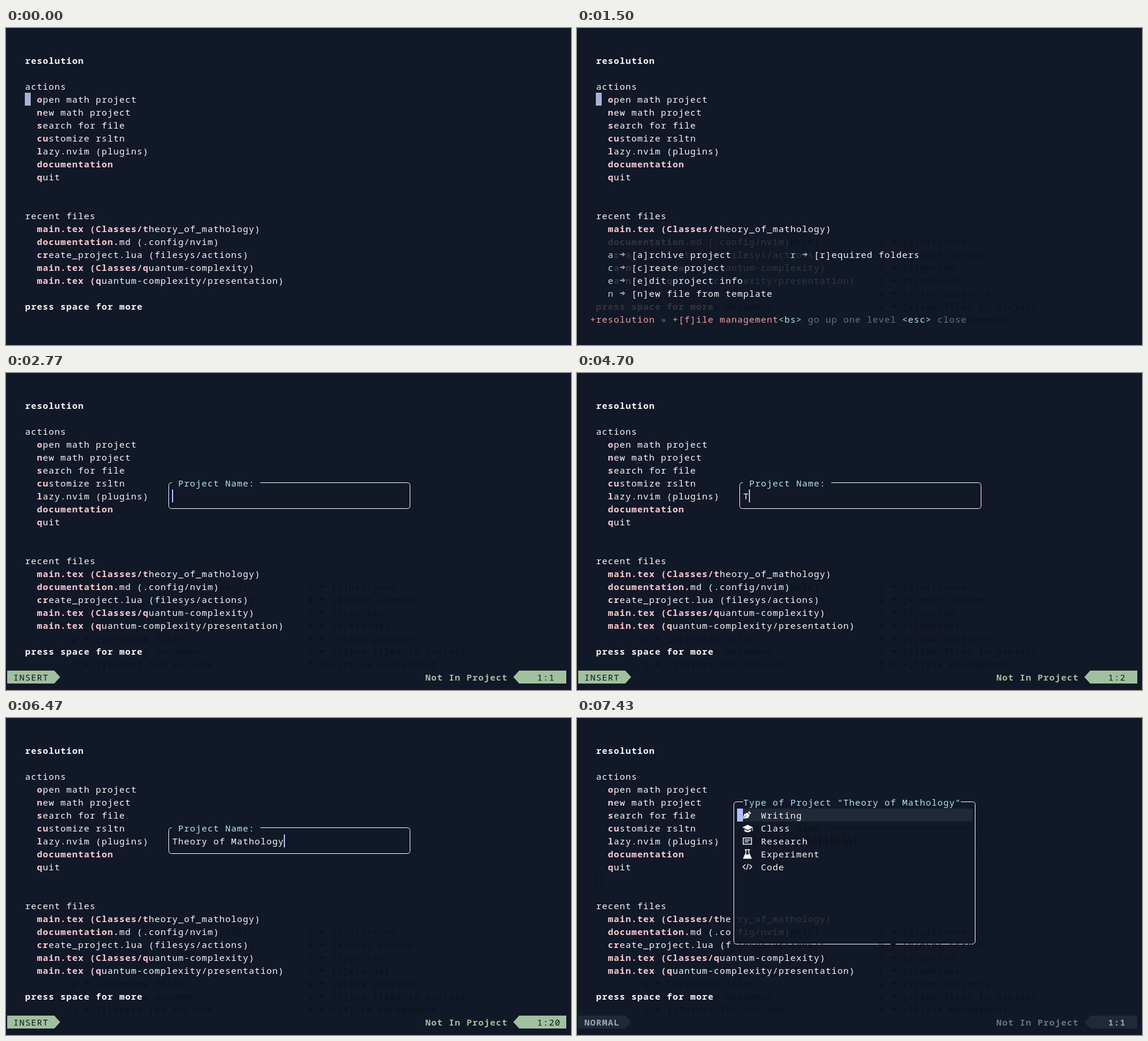
Write an HTML page that moves like this. It is 960x539 px and loops after 8 s.

```html
<!DOCTYPE html>
<html lang="en">
<head>
<meta charset="utf-8">
<title>Project launcher</title>
<style>
html, body { margin: 0; width: 100%; height: 100%; overflow: hidden; background: #111827; }
svg { display: block; width: 100%; height: 100%; }
text { font: 15px "Noto Sans Mono", "DejaVu Sans Mono", monospace; letter-spacing: 1px; white-space: pre; font-variant-ligatures: none; }
text.b { font-weight: 700; }
</style>
</head>
<body>
<svg id="stage" viewBox="0 0 960 539"></svg>
<script>
const LOOP = 8000, ROWS = 24, COLS = 96, CW = 10, RH = 22;
const C = {
  bg: '#111827', text: '#f9fafb', pink: '#fecdd3', cyan: '#b6e3f4', salmon: '#f0a0a0',
  gray: '#6b7280', arrow: '#9298a3', dim: '#34363b', ghost: '#0c111c', green: '#a0c09f',
  bar: '#1f2937', lilac: '#b4befe', cursor: '#abb0d8', rose: '#ddc9c9', soft: '#9ca3af'
};

// row, number of highlighted letters, text
const LINKS = [
  [5, 1, 'open math project'],
  [6, 1, 'new math project'],
  [7, 1, 'search for file'],
  [8, 2, 'customize rsltn'],
  [9, 1, 'lazy.nvim (plugins)'],
  [10, 13, 'documentation'],
  [11, 1, 'quit'],
  [15, 19, 'main.tex (Classes/theory_of_mathology)'],
  [16, 14, 'documentation.md (.config/nvim)'],
  [17, 2, 'create_project.lua (filesys/actions)'],
  [18, 19, 'main.tex (Classes/quantum-complexity)'],
  [19, 11, 'main.tex (quantum-complexity/presentation)']
];
const ROOT_LEFT = ['c[c]hoose a theme (pumpkin)', 'd[d]ocumentation for project', 'm[m]ake new snippet',
  'o[o]pen pdf viewer', 'p[p]review files', 'c[c]ompile document', 'i[i]nsert TeX include'];
const ROOT_RIGHT = ['q[q]uit/save', 'R[R]eset screen', 'S[S]ynctex', 't[t]erminal',
  'V[V]iew projects', 'v[v]iew files in project', 'f+[f]ile management'];
const FILE_LEFT = ['a[a]rchive project', 'c[c]reate project', 'e[e]dit project info', 'n[n]ew file from template'];
const FILE_RIGHT = ['r[r]equired folders'];
const KINDS = ['Writing', 'Class', 'Research', 'Experiment', 'Code'];

const NAME = 'Theory of Mathology';
// bursts of typing: first key, last key, number of keys
const BURSTS = [[4700, 5430, 10], [5570, 5830, 4], [5970, 6100, 2], [6270, 6300, 2], [6470, 6470, 1]];
const KEYS = BURSTS.flatMap(([a, b, n]) =>
  Array.from({ length: n }, (_, i) => n > 1 ? a + (b - a) * i / (n - 1) : a));

const SCENES = [[0, 'home'], [1000, 'root'], [1500, 'files'], [2730, 'ask'], [2770, 'type'],
  [7370, 'back'], [7400, 'kinds'], [7430, 'pick']];

const stage = document.getElementById('stage');
let grid, under, over;

const X = col => 2 + col * CW;
const Y = row => row * RH;
const esc = s => s.replace(/&/g, '&amp;').replace(/</g, '&lt;').replace(/>/g, '&gt;');
const rect = (x, y, w, h, fill) => `<rect x="${x}" y="${y}" width="${w}" height="${h}" fill="${fill}"/>`;
const path = (d, fill, stroke = 'none', width = 1) =>
  `<path d="${d}" fill="${fill}" stroke="${stroke}" stroke-width="${width}"/>`;
const block = (col, row, fill) => rect(X(col), Y(row), CW, RH, fill);

function put(row, col, text, color = C.text, bold = false, overlay = false) {
  [...text].forEach((ch, i) => {
    if (!overlay || ch !== ' ') grid[row][col + i] = { ch, color, bold };
  });
}

function recolor(r0, r1, c0, c1, color) {
  for (let r = r0; r <= r1; r++)
    for (let c = c0; c <= c1; c++)
      if (grid[r][c] && grid[r][c].color !== C.ghost) grid[r][c].color = color;
}

function menu(items, row, col, tint) {
  items.forEach((item, i) => {
    const label = item.slice(1), group = label[0] === '+';
    put(row + i, col, item[0], tint || C.cyan);
    put(row + i, col + 2, '→', tint || C.arrow);
    put(row + i, col + 4, label, tint || (group ? C.salmon : C.text), false, true);
  });
}

function rootMenu(tint) {
  menu(ROOT_LEFT, 16, 11, tint);
  menu(ROOT_RIGHT, 16, 51, tint);
}

function home() {
  put(2, 3, 'resolution', C.text, true);
  put(4, 3, 'actions');
  put(14, 3, 'recent files');
  put(21, 3, 'press space for more', C.text, true);
  for (const [row, n, text] of LINKS) {
    put(row, 5, text.slice(0, n), C.pink, true);
    put(row, 5 + n, text.slice(n));
  }
}

function fileMenu() {
  menu(FILE_LEFT, 17, 5);
  menu(FILE_RIGHT, 17, 36);
  const parts = [['+resolution', C.salmon], [' » ', C.gray], ['+[f]ile management', C.salmon],
    ['<bs>', C.cyan], [' go up one level ', C.gray], ['<esc>', C.cyan], [' close', C.gray]];
  let col = 2;
  for (const [text, color] of parts) {
    put(22, col, text, color);
    col += text.length;
  }
}

// rounded frame, open along the top between gap0 and gap1
function frame(x0, y0, x1, y1, gap0, gap1, color) {
  const r = 5;
  return path(`M${gap1} ${y0}H${x1 - r}q${r} 0 ${r} ${r}V${y1 - r}q0 ${r} ${-r} ${r}H${x0 + r}` +
    `q${-r} 0 ${-r} ${-r}V${y0 + r}q0 ${-r} ${r} ${-r}H${gap0}`, 'none', color);
}

function askBox(typed, ghost) {
  const line = ghost ? C.ghost : C.text;
  under += frame(276.5, 186.5, 686.5, 230.5, 282, 432, line);
  put(8, 29, 'Project Name:', ghost ? C.ghost : C.cyan);
  put(9, 28, typed, line);
  if (!ghost) over += rect(X(28 + typed.length), Y(9), 2, RH, C.lilac);
  else for (let i = 0; i <= typed.length; i++) under += rect(X(28 + i), Y(9), 1.5, RH, C.ghost);
}

function status(mode, pos) {
  const on = mode === 'INSERT', fill = on ? C.green : C.bar, ink = on ? C.bg : C.soft;
  under += path('M2 506H82L92 517 82 528H2zM952 506H872L862 517 872 528H952z', fill);
  put(23, 1, mode, ink, !on);
  put(23, 71, 'Not In Project', on ? C.green : C.gray, true);
  put(23, 90, pos, ink, !on);
}

function icons() {
  const w = C.text;
  return path('M281.5 171.5 284 163.5 289.5 161 293.5 165 291 170zM290.5 160 292.5 158.5 295.5 161.5 294 164z', w) +
    path('M282.5 170.5 287.5 165.5', 'none', C.bar) +
    path('M281 186 290 181.5 299 186 290 190.5zM284.5 189.2V192.5Q290 196 295.5 192.5V189.2L290 192z', w) +
    path('M298 186V192', 'none', w) +
    path('M282.5 204H296.5V214.5H282.5zM285 207.5H294.5M285 210.5H291.5', 'none', w, 1.5) +
    path('M285 224H294M287 224V229.5L283 238.5H296L292 229.5V224', 'none', w, 1.5) +
    path('M286 232H293L296.5 239H282.5z', w) +
    path('M286 249 282 253 286 257M293 249 297 253 293 257M291 248 288 258', 'none', w, 1.4);
}

function kindBox() {
  for (let r = 6; r <= 17; r++) grid[r][26] = null;
  recolor(7, 16, 27, 66, C.dim);
  recolor(17, 17, 27, 66, C.ghost);
  under += frame(266.5, 142.5, 676.5, 384.5, 282, 652, C.text);
  under += rect(272, 154, 400, 22, C.bar) + block(27, 7, C.lilac);
  put(6, 28, `Type of Project "${NAME}"`, C.cyan);
  KINDS.forEach((kind, i) => put(7 + i, 31, kind));
  over += icons();
}

function gridMarkup() {
  let out = '';
  grid.forEach((cells, row) => {
    for (let c = 0; c < COLS; c++) {
      const cell = cells[c];
      if (!cell) continue;
      if (cell.ch === '→') {
        const x = X(c), y = Y(row) + 11;
        out += path(`M${x + 1} ${y - 1}h4.5v-3l4.5 4 -4.5 4v-3h-4.5z`, cell.color);
        continue;
      }
      let run = cell.ch, next;
      const start = c;
      while ((next = cells[c + 1]) && next.ch !== '→' && next.color === cell.color && next.bold === cell.bold) {
        run += next.ch;
        c++;
      }
      out += `<text x="${X(start) + 0.5}" y="${Y(row) + 17}" fill="${cell.color}"` +
        `${cell.bold ? ' class="b"' : ''}>${esc(run)}</text>`;
    }
  });
  return out;
}

function draw(scene, typed) {
  grid = Array.from({ length: ROWS }, () => Array(COLS).fill(null));
  under = over = '';
  const late = ['back', 'kinds', 'pick'].includes(scene);
  if (scene !== 'home' && scene !== 'root') rootMenu(C.ghost);
  if (late) askBox(NAME, true);
  home();
  if (scene === 'home' || scene === 'files') under += block(3, 5, C.cursor);
  if (scene === 'root') {
    under += block(3, 5, C.lilac);
    recolor(15, 22, 0, COLS - 1, C.dim);
    rootMenu();
  }
  if (scene === 'files') {
    recolor(16, 22, 0, COLS - 1, C.dim);
    fileMenu();
  }
  if (scene === 'ask' || scene === 'type') askBox(NAME.slice(0, typed));
  if (scene === 'type') status('INSERT', '1:' + (typed + 1));
  if (scene === 'back') under += block(3, 12, C.rose);
  if (scene === 'kinds' || scene === 'pick') {
    under += path('M32.5 264.5H41.5V285.5H32.5z', 'none', C.ghost);
    kindBox();
  }
  if (scene === 'pick') status('NORMAL', '1:1');
  stage.innerHTML = rect(0, 0, 960, 539, C.bg) + under + gridMarkup() + over;
}

let shown = '';
const began = performance.now();
function tick(now) {
  const t = Math.max(0, now - began) % LOOP;
  const scene = SCENES.filter(s => s[0] <= t).pop()[1];
  const typed = KEYS.filter(k => k <= t).length;
  const key = scene + typed;
  if (key !== shown) {
    draw(scene, typed);
    shown = key;
  }
  requestAnimationFrame(tick);
}
tick(began);
</script>
</body>
</html>
```
